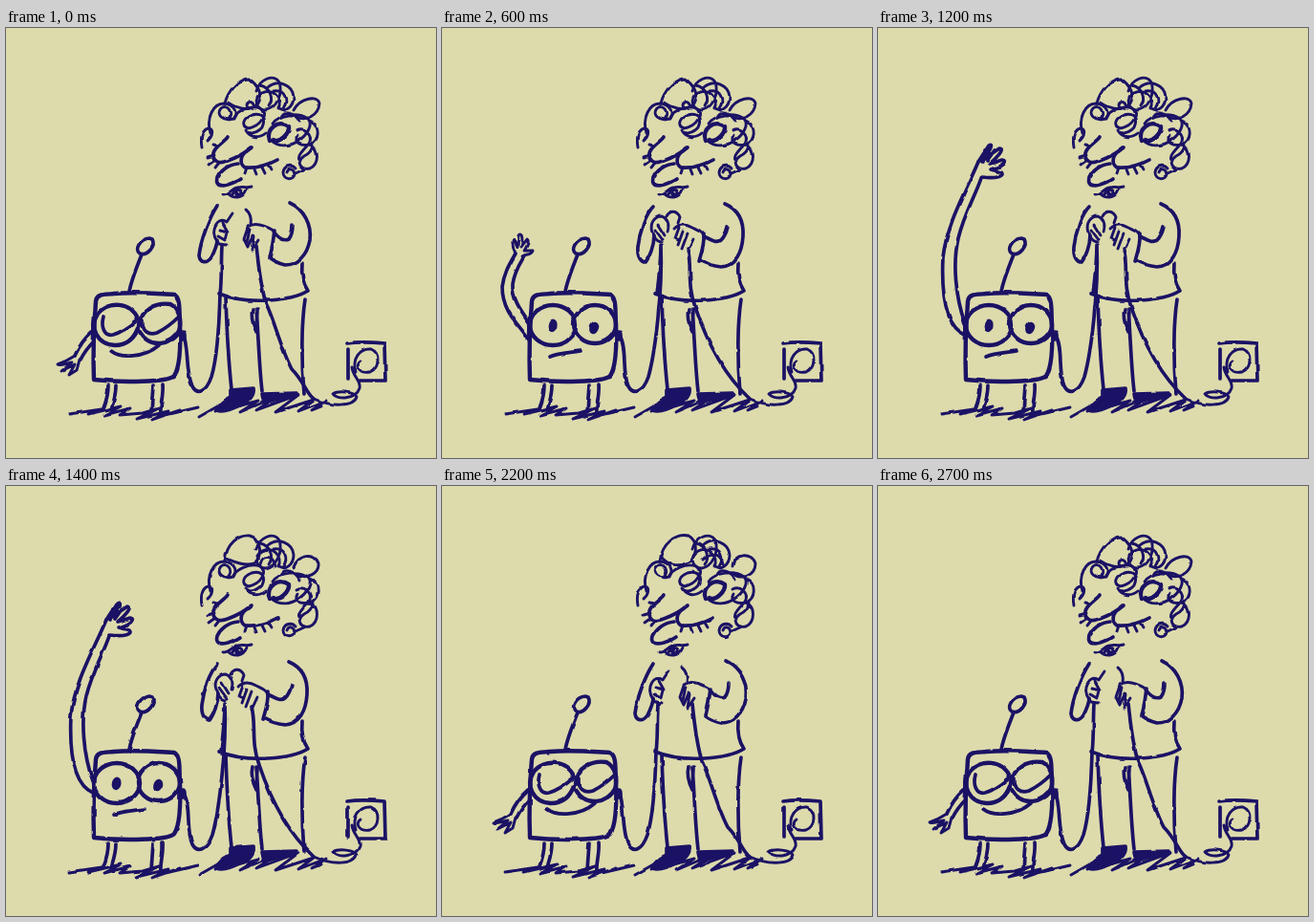
Recreate the animation shown at these times as an HTML page without scripts. Size 450 px wide and 450 px high, loop 2.8 s.

```html
<!DOCTYPE html>
<html lang="en">
<head>
<meta charset="utf-8">
<title>Robot and cable</title>
<style>
  html, body { margin: 0; width: 100%; height: 100%; overflow: hidden; background: #dddbac; }
  svg { display: block; width: 100vw; height: 100vh; }
  .ink { fill: none; stroke: #1b1265; stroke-width: 3.7; stroke-linecap: round; stroke-linejoin: round; }
  .thin { stroke-width: 2.9; }
  .bold { stroke-width: 4.4; }
  .solid { fill: #1b1265; }
</style>
</head>
<body>
<svg viewBox="0 0 450 450">
  <defs>
    <!-- Hand-drawn wobble, redrawn every 100 ms in a cycle of three -->
    <filter id="boil" filterUnits="userSpaceOnUse" x="0" y="0" width="450" height="450" color-interpolation-filters="sRGB">
      <feTurbulence type="fractalNoise" baseFrequency=".06" numOctaves="2" seed="4">
        <animate attributeName="seed" dur="2.8s" repeatCount="indefinite" calcMode="discrete"
          values="4;9;15;4;9;15;4;9;15;4;9;15;4;9;15;4;9;15;4;9;15;4;9;15;4;9;15;4"/>
      </feTurbulence>
      <feDisplacementMap in="SourceGraphic" scale="2.6" xChannelSelector="R" yChannelSelector="G"/>
    </filter>

    <g id="armMid">
      <path d="M92 328C83 312 63 299 63 271C65 255 72 245 77 236M92 309C82 295 73 283 74 268C76 254 82 246 86 239"/>
      <path class="thin" d="M77 236C73 228 73 219 76 222L79 229L80 217C84 213 85 222 83 229L89 221C92 223 88 230 86 233L95 233C94 238 88 236 84 239"/>
    </g>
    <g id="armUp">
      <path d="M91 321C72 313 66 282 68 240C72 205 90 175 105 140M91 309C81 281 78 246 84 220C90 195 102 175 108 157"/>
      <path d="M105 140L116 123C121 120 118 127 111 137L127 126C133 126 126 134 117 142L130 138C136 139 130 145 118 148L129 151C133 155 124 158 109 156M112 128L109 140M122 128L114 139"/>
    </g>
  </defs>

  <rect width="450" height="450" fill="#dddbac"/>

  <g class="ink" filter="url(#boil)">
    <!-- Curls -->
    <g class="thin">
      <path d="M205 125C203 114 206 106 212 105C218 106 216 114 211 118M214 110C209 94 217 79 228 79C240 80 243 90 237 95C228 98 219 91 225 84C231 79 238 88 233 94"/>
      <path d="M262 66C265 54 280 47 286 57C290 69 283 84 272 86C262 86 258 74 268 68C279 62 290 74 285 84M274 62C285 53 300 60 301 72C301 82 292 90 285 83M266 60C276 62 281 74 275 82M280 66C292 64 296 76 290 84"/>
      <path d="M238 95C239 88 255 80 266 84C274 90 267 102 254 105C246 103 247 95 257 91C268 88 272 95 268 104C263 110 254 112 251 107C256 116 266 115 272 110"/>
      <path class="bold" d="M276 118C271 106 285 95 296 103C297 110 286 121 280 117"/>
      <path d="M279 100C286 90 306 88 316 95C322 101 315 112 306 118C298 124 285 125 278 118M288 93C291 85 303 89 307 98M318 97C330 102 328 118 318 122C308 124 301 120 305 113M304 108C312 104 322 112 317 121C311 128 303 135 308 139M318 122C328 126 328 142 318 147C308 149 303 140 312 134C318 131 320 128 321 122M312 148L303 152"/>
      <path d="M303 147C299 142 291 144 290 151C290 159 301 160 302 153C301 147 296 146 294 151"/>
    </g>
    <g class="thin">
      <path d="M229 79C232 66 243 53 254 53C261 58 267 65 266 74C263 85 250 89 233 78M301 86C308 73 326 70 328 79C327 92 313 98 304 93M253 84C250 78 256 75 259 80"/>
      <animate attributeName="opacity" dur="2.8s" repeatCount="indefinite" calcMode="discrete"
        values="1;0;0;1;0;0;1;0;0;1;0;0;1;0;0;1;0;0;1;0;0;1;0;0;1;0;0;1"/>
    </g>
    <g class="thin" opacity="0">
      <path d="M228 79C230 60 245 49 258 52C269 58 267 77 256 81C246 85 236 82 230 75M304 84C305 70 325 69 328 81C328 95 311 99 305 91M273 77C280 68 292 70 294 82"/>
      <animate attributeName="opacity" dur="2.8s" repeatCount="indefinite" calcMode="discrete"
        values="0;1;0;0;1;0;0;1;0;0;1;0;0;1;0;0;1;0;0;1;0;0;1;0;0;1;0;0"/>
    </g>
    <g class="thin" opacity="0">
      <path d="M229 78C231 60 243 51 255 52C268 55 268 74 260 81C248 84 238 79 231 76M301 85C306 71 324 70 327 81C328 91 315 99 303 92M266 82C268 72 279 71 282 84"/>
      <animate attributeName="opacity" dur="2.8s" repeatCount="indefinite" calcMode="discrete"
        values="0;0;1;0;0;1;0;0;1;0;0;1;0;0;1;0;0;1;0;0;1;0;0;1;0;0;1;0"/>
    </g>

    <!-- Face -->
    <path d="M232 114C228 120 219 123 217 131C216 139 222 143 232 139C243 135 250 131 257 125M254 127C246 132 243 141 250 146C262 147 275 143 284 138"/>
    <path class="thin" d="M217 122L221 123M218 133L211 135M219 138L212 143M223 141L219 146M252 146L250 152M260 148L262 153M268 146L271 152M275 143L278 148"/>
    <path d="M243 142C232 143 224 150 221 157C219 165 224 166 232 164C238 162 241 161 245 158"/>
    <path class="thin" d="M227 174C235 174 238 166 243 167C248 165 250 168 257 166M232 173C238 179 248 179 252 169M236 175C240 169 246 168 247 172C246 177 239 177 241 171L245 175"/>

    <!-- Clothes -->
    <path d="M223 278C235 283 255 286 275 285C292 284 306 281 316 275C311 268 309 257 310 246M230 282C231 315 233 350 236 378M262 294C264 320 265 355 268 380M258 294C256 302 259 312 262 318L263 294M313 284C309 310 309 350 312 383"/>

    <!-- Shoes and ground -->
    <path class="solid" d="M235 379L259 377C260 384 255 391 246 394C237 399 228 403 220 400C222 394 229 389 235 386ZM268 383L304 382L288 388L270 393Z"/>
    <path class="thin" d="M202 407L230 391L219 401L258 380L228 400L264 390L245 402L285 385L262 400L306 384L282 402L322 389L306 401L335 390L320 400L330 396"/>
    <path class="thin" d="M66 404L100 399L86 404L120 396L103 405L130 398L119 405L143 403L160 398L137 409L170 401L153 410L182 400L167 405L201 397"/>

    <!-- Socket and plug -->
    <path d="M357 330C370 328 385 329 396 330L397 369L370 369M358 336L358 367"/>
    <path class="thin" d="M366 360C362 346 370 335 382 336C392 340 391 356 381 360C369 362 365 353 371 349M362 355C363 365 372 369 370 377C366 389 346 389 342 383C348 379 365 381 367 386C364 396 342 397 322 388"/>

    <!-- Hands apart -->
    <g>
      <path d="M221 186C212 200 204 222 202 238C203 246 210 247 215 240C219 232 221 226 221 222M297 183C312 190 320 206 318 222C315 238 305 248 292 248C285 246 280 244 276 241M281 212C280 222 278 232 276 240M280 213C286 221 292 223 296 221C300 216 300 210 300 206"/>
      <path class="thin" d="M237 194L231 203C226 199 220 202 218 210C216 217 220 222 223 226L230 227M227 204L232 213L224 211M231 214L229 222L222 218M251 190C256 194 257 200 256 206M253 208C260 203 270 206 280 212M253 209L249 221L253 229L258 217M255 211L252 224M259 218L257 233L264 222"/>
      <path d="M226 228C225 245 226 262 224 279C223 315 221 345 215 365C209 382 200 384 195 375C188 360 191 335 186 322M262 228C264 248 266 268 272 288C281 306 287 334 299 357C312 370 314 382 322 388"/>
      <animate attributeName="visibility" dur="2.8s" repeatCount="indefinite" calcMode="discrete" keyTimes="0;.1428;.7142" values="visible;hidden;visible"/>
    </g>
    <!-- Hands together -->
    <g visibility="hidden">
      <path d="M221 187C213 195 207 213 205 229C204 239 208 245 213 245C217 240 222 228 222 217M296 184C310 190 316 202 315 218C314 235 307 249 292 250C283 249 275 246 270 243M274 215C275 225 272 234 269 244M274 218C281 221 287 226 292 222C297 217 298 212 299 208"/>
      <path class="thin" d="M220 213C217 205 222 197 230 197C237 200 238 206 236 213M226 206L233 217M223 211L231 222M221 214C222 221 225 223 229 224M235 197C239 190 246 191 249 198L247 204M243 210C248 205 255 205 262 209C268 212 274 214 274 220M248 209L244 220L249 222M252 213L247 227M257 215L251 231M263 221L257 234"/>
      <path d="M229 227C229 245 227 262 225 278M229 228C231 275 223 340 216 365C210 382 200 384 195 375C188 360 194 335 186 322M257 231C262 250 256 268 265 292C276 325 292 360 322 388"/>
      <animate attributeName="visibility" dur="2.8s" repeatCount="indefinite" calcMode="discrete" keyTimes="0;.1428;.7142" values="hidden;visible;hidden"/>
    </g>

    <!-- Robot -->
    <path d="M150 220C140 221 134 232 140 236C148 239 157 228 153 221ZM142 237C137 250 131 264 129 276M107 374C107 385 104 393 102 398M115 374C115 385 112 392 110 399M154 374L152 402M164 373C165 385 161 395 162 403"/>
    <path class="bold" d="M94 286C95 278 102 279 113 278C135 276 158 278 176 279C183 283 181 295 182 310C183 335 182 355 176 364C170 371 120 371 92 368C91 340 92 310 94 286"/>
    <ellipse class="solid" cx="185" cy="322" rx="2" ry="4"/>

    <!-- Drowsy smile -->
    <g>
      <path class="bold" d="M138 304C131 287 107 285 96 299C87 313 95 331 114 332C127 332 134 325 138 314M140 311C141 294 157 287 172 289C182 294 184 307 181 317C174 331 151 337 140 318"/>
      <path d="M102 302C99 313 103 323 112 321C122 318 130 312 137 306M143 306C142 317 149 322 158 319C168 314 175 308 181 302M110 338C120 346 145 345 160 332"/>
      <animate attributeName="visibility" dur="2.8s" repeatCount="indefinite" calcMode="discrete" keyTimes="0;.1428;.7142" values="visible;hidden;visible"/>
    </g>
    <!-- Awake -->
    <g visibility="hidden">
      <ellipse class="bold" cx="116" cy="311" rx="24" ry="21"/>
      <ellipse class="bold" cx="160" cy="310" rx="22" ry="20"/>
      <ellipse class="solid" cx="115.500" cy="311.500" rx="3" ry="5" transform="rotate(12 116 312)"/>
      <ellipse class="solid" cx="159" cy="313.500" rx="3" ry="5" transform="rotate(18 159 314)"/>
      <path d="M113 344C122 340 132 340 145 338"/>
      <animate attributeName="visibility" dur="2.8s" repeatCount="indefinite" calcMode="discrete" keyTimes="0;.1428;.7142" values="hidden;visible;hidden"/>
    </g>

    <!-- Arm: down, low, middle, high, up -->
    <g>
      <path d="M90 318C83 324 76 334 72 343M92 328C86 334 81 341 78 347"/>
      <path class="thin" d="M72 343C66 347 60 350 54 352C60 354 65 350 69 350L58 359L72 352L66 363L74 358L77 347"/>
      <animate attributeName="visibility" dur="2.8s" repeatCount="indefinite" calcMode="discrete" keyTimes="0;.1785;.7857" values="visible;hidden;visible"/>
    </g>
    <use href="#armMid" visibility="hidden" transform="translate(0 131) scale(1 .6)">
      <animate attributeName="visibility" dur="2.8s" repeatCount="indefinite" calcMode="discrete" keyTimes="0;.1785;.2142;.75;.7857" values="hidden;visible;hidden;visible;hidden"/>
    </use>
    <use href="#armMid" visibility="hidden">
      <animate attributeName="visibility" dur="2.8s" repeatCount="indefinite" calcMode="discrete" keyTimes="0;.2142;.25;.7142;.75" values="hidden;visible;hidden;visible;hidden"/>
    </use>
    <use href="#armUp" visibility="hidden" transform="translate(0 70) scale(1 .78)">
      <animate attributeName="visibility" dur="2.8s" repeatCount="indefinite" calcMode="discrete" keyTimes="0;.25;.2857;.6785;.7142" values="hidden;visible;hidden;visible;hidden"/>
    </use>
    <use href="#armUp" visibility="hidden">
      <animate attributeName="visibility" dur="2.8s" repeatCount="indefinite" calcMode="discrete" keyTimes="0;.2857;.6785" values="hidden;visible;hidden"/>
    </use>
  </g>
</svg>
</body>
</html>
```
